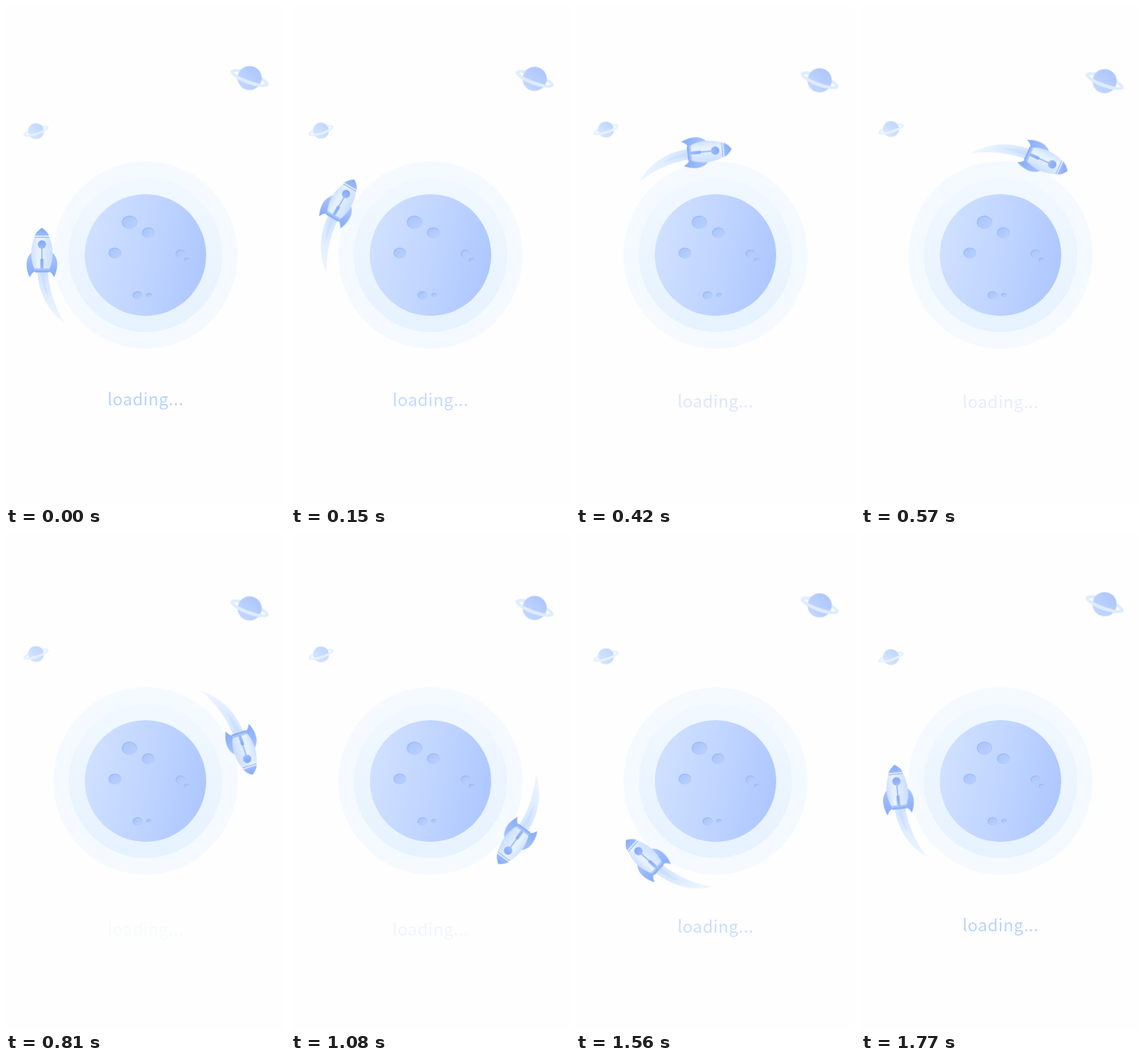
An HTML page for the animation above (1800 ms loop, 400 by 712 pixels).

```html
<!DOCTYPE html>
<html lang="en">
<head>
<meta charset="utf-8">
<title>Loading</title>
<style>
  html, body { margin: 0; width: 100%; height: 100%; overflow: hidden; background: #fefefe; }
  svg { display: block; width: 100vw; height: 100vh; }
  #rocket { transform-origin: 200px 356px; }
  text {
    font: 500 24px "Noto Sans CJK SC", "Noto Sans CJK JP", "Noto Sans", sans-serif;
    letter-spacing: .5px;
    fill: #b9d2fe;
  }
</style>
</head>
<body>
<svg viewBox="0 0 400 712">
  <defs>
    <linearGradient id="globe" x1="0" y1=".4" x2="1" y2=".62">
      <stop offset="0" stop-color="#d0e0ff"/>
      <stop offset=".5" stop-color="#c0d5ff"/>
      <stop offset="1" stop-color="#adc7ff"/>
    </linearGradient>
    <linearGradient id="halo" x1="0" y1="0" x2="0" y2="1">
      <stop offset="0" stop-color="#f1f8ff"/>
      <stop offset="1" stop-color="#e6f2ff"/>
    </linearGradient>
    <linearGradient id="crater" x1="0" y1="0" x2="1" y2="1">
      <stop offset="0" stop-color="#a9c4fa"/>
      <stop offset="1" stop-color="#bad1ff"/>
    </linearGradient>
    <linearGradient id="moon" x1="0" y1="1" x2="1" y2="0">
      <stop offset="0" stop-color="#c6daff"/>
      <stop offset="1" stop-color="#a9c3fb"/>
    </linearGradient>
    <linearGradient id="paleMoon" x1="0" y1="1" x2="1" y2="0">
      <stop offset="0" stop-color="#d9e8ff"/>
      <stop offset="1" stop-color="#bcd3fd"/>
    </linearGradient>
    <linearGradient id="hull">
      <stop offset="0" stop-color="#cfe1ff"/>
      <stop offset=".35" stop-color="#e8f3ff"/>
      <stop offset="1" stop-color="#cadeff"/>
    </linearGradient>
    <linearGradient id="metal" x1="0" y1="0" x2="0" y2="1">
      <stop offset="0" stop-color="#83a8f5"/>
      <stop offset="1" stop-color="#9dbcfb"/>
    </linearGradient>
    <linearGradient id="fin" x1="0" y1="0" x2="0" y2="1">
      <stop offset="0" stop-color="#a9c5fd"/>
      <stop offset="1" stop-color="#86abf7"/>
    </linearGradient>
    <linearGradient id="trail" x1="0" y1="0" x2="0" y2="1">
      <stop offset="0" stop-color="#d2e4ff"/>
      <stop offset="1" stop-color="#eff7ff"/>
    </linearGradient>
  </defs>

  <ellipse cx="200" cy="356" rx="132" ry="134" fill="#f4faff"/>
  <circle cx="200" cy="356" r="110" fill="url(#halo)"/>
  <circle cx="200" cy="356" r="87" fill="url(#globe)"/>
  <g id="craters"></g>
  <g id="big"></g>
  <g id="small"></g>

  <g id="rocket">
    <path d="M45 380 C47 408 58 434 84.500 454 C71 432 62 408 60 380Z" fill="url(#trail)"/>
    <path d="M49 380 C51 393 54 404 60 415 C57 402 56 391 56 380Z" fill="#c6dbff" opacity=".65"/>
    <g id="fins"></g>
    <path d="M41 330.500 H62 C68 344 69 361 62 377 H41 C34 361 35 344 41 330.500Z" fill="url(#hull)"/>
    <path d="M51.500 317 C46.500 320.500 42.500 324.500 41.200 328.500 H61.800 C60.500 324.500 56.500 320.500 51.500 317Z" fill="url(#metal)"/>
    <path d="M41 330.500 H62" stroke="#8eb1f8" stroke-width="1.200"/>
    <path d="M51.500 346 V362" stroke="#86abf6" stroke-width="1.400"/>
    <rect x="49.300" y="361" width="4.400" height="15" rx="2" fill="url(#metal)"/>
    <circle cx="51.500" cy="341" r="6" fill="url(#metal)"/>
    <path d="M39.800 375.500 H63.200 L61.500 381 H41.500Z" fill="#8fb2f9"/>
    <path d="M40.500 377 H62.500" stroke="#c9ddff" stroke-width=".8"/>
  </g>

  <text id="label" x="145.500" y="571">loading...</text>
</svg>
<script>
const $ = id => document.getElementById(id);
const LOOP = 1800, TICK = 30;

// x, y, horizontal radius, vertical radius
$('craters').innerHTML = [
  [177, 309, 11, 9.300], [204, 324, 9.200, 7.500], [156, 353, 9.200, 7.500],
  [250, 354, 6.800, 6], [259, 363, 4, 3], [188.500, 413.500, 7, 5.800], [205, 413, 3.800, 2.800]
].map(([x, y, rx, ry]) => `
  <ellipse cx="${x}" cy="${y}" rx="${rx}" ry="${ry}" fill="#9dbbf5"/>
  <ellipse cx="${x + .6}" cy="${y + .7}" rx="${rx - .7}" ry="${ry - .8}" fill="url(#crater)"/>`).join('');

const finPath = 'M37 352 C27 361 28 375 34 388 C36 383 39 380 42.500 379 C39 370 37 362 37 352Z';
$('fins').innerHTML = `<g fill="url(#fin)"><path d="${finPath}"/>
  <path d="${finPath}" transform="translate(103 0) scale(-1 1)"/></g>`;

function ringed(id, x, y, r, tilt, fill, ring) {
  const a = r * 1.67, b = r * .5, c = r * 1.36, d = r * .2;
  const half = (s, t) =>
    `M${-a} 0 A${a} ${b} 0 0 ${s} ${a} 0 L${c} 0 A${c} ${d} 0 0 ${t} ${-c} 0Z`;
  $(id).innerHTML = `<g transform="translate(${x} ${y}) rotate(${tilt})">
    <path d="${half(1, 0)}" fill="${ring}"/>
    <circle r="${r}" fill="url(#${fill})" transform="rotate(${-tilt})"/>
    <path d="${half(0, 1)}" fill="${ring}"/></g>`;
}
ringed('big', 349.300, 103, 17.300, 20, 'moon', '#deecff');
ringed('small', 43, 179, 11.400, -18, 'paleMoon', '#e5f1ff');

const play = (id, frames) => $(id).animate(frames, { duration: LOOP, iterations: Infinity });
const steps = n => `steps(${n}, end)`;

// Out and back at constant speed, turning at half the loop
function swing(id, dy, fade) {
  const pose = (y, opacity) => ({
    transform: `translate(0px, ${y}px)`, opacity, easing: steps(LOOP / TICK / 2)
  });
  play(id, [pose(0, 1), pose(dy, fade), pose(0, 1)]);
}

play('rocket', [
  { transform: 'rotate(0deg)', easing: steps(LOOP / TICK) },
  { transform: 'rotate(360deg)' }
]);
swing('big', 7, 1);
swing('small', -5, 1);
swing('label', 7, 0);
</script>
</body>
</html>
```
